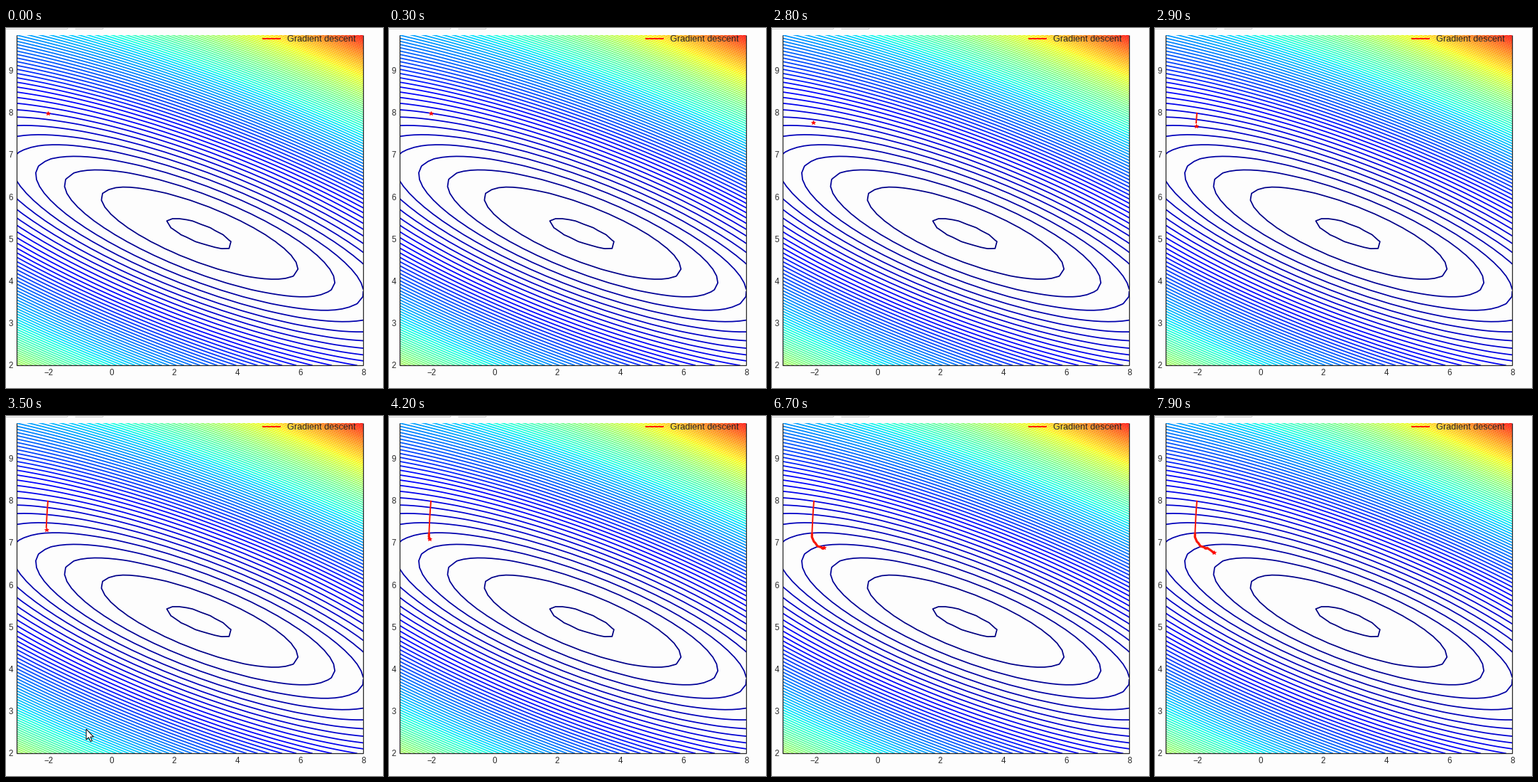
Write a matplotlib script that moves like this. It is 531 px wide and 506 px high and loops after 8000 ms.

```python
import numpy as np
import matplotlib.pyplot as plt
from matplotlib.animation import FuncAnimation
from matplotlib.patches import Polygon, Rectangle

W, H, DPI = 531, 506, 64
STEP_MS, FRAMES = 100, 80
PT = 72 / DPI  # points per pixel
INK = "0.15"
LEFT, RIGHT, TOP, BOTTOM = 15.3, 503.3, 9.5, 474.3

plt.rcParams["font.family"] = "Liberation Sans"
fig = plt.figure(figsize=(W / DPI, H / DPI), dpi=DPI, facecolor="#fdfdfd")
ax = fig.add_axes([0, 0, 1, 1])
ax.set(xlim=(0, W), ylim=(H, 0))
ax.axis("off")


def to_px(x, y):
    return 148.4 + 44.36 * x, BOTTOM - 59.25 * (y - 2)


def line(xs, ys, color=INK, width=1.25, z=5, **kw):
    return ax.plot(xs, ys, color=color, lw=width * PT, zorder=z, **kw)[0]


def label(x, y, text, size, ha):
    ax.text(x, y, text, fontsize=size * PT, color=INK, ha=ha,
            va="center_baseline", zorder=6)


def draw_cost():
    """Quadratic cost of a two-parameter fit, as evenly spaced contours."""
    x, y = np.meshgrid(np.linspace(-3, 8, 50), np.linspace(2, 10, 50))
    px, py = to_px(x, y)
    u, v = (px - 272.7) / 130.6, (py - 288.5) / 61.26
    rho = 0.765
    cost = (u * u - 2 * rho * u * v + v * v) / (1 - rho * rho)
    levels = 0.128 + np.arange(97)
    curves = ax.contour(px, py, cost, levels=levels, cmap="jet",
                        linewidths=1.75 * PT, zorder=2)
    curves.set_clip_path(Rectangle((LEFT, TOP), RIGHT - LEFT, BOTTOM - TOP,
                                   transform=ax.transData))


def draw_frame():
    line([LEFT, LEFT, RIGHT, RIGHT], [TOP, BOTTOM, BOTTOM, TOP],
         solid_capstyle="butt", solid_joinstyle="miter")
    for x in range(-2, 9, 2):
        label(to_px(x, 0)[0], 484, str(x).replace("-", "\u2212"), 11.5, "center")
    for y in range(2, 10):
        label(10.3, to_px(0, y)[1] - 0.3, str(y), 11.5, "right")
    line([360.5, 386.5], [14.5, 14.5], "red", 1.75, solid_capstyle="butt")
    label(396, 14.3, "Gradient descent", 12.6, "left")
    for a, b in [(0, 87), (98, 137)]:
        line([a, b - 1, b], [1.5, 1.5, 0], "0.8", 1)


draw_cost()
draw_frame()

# Path of the estimate: update number, x, y
KEYS = np.array([
    (0, 59, 119.8), (1, 58, 133.3), (3, 57.4, 143), (8, 56.6, 160),
    (13, 56.2, 170), (18, 59, 176.5), (19, 61, 178.5), (21, 63.4, 182),
    (22, 64.2, 183), (30, 70, 184.8), (31, 70.6, 186), (33, 72.3, 186.3),
    (35, 73.4, 185.3), (42, 79.5, 189.5), (46, 82.7, 192.3),
])
steps = np.arange(47)
path_x = np.interp(steps, KEYS[:, 0], KEYS[:, 1])
path_y = np.interp(steps, KEYS[:, 0], KEYS[:, 2])

FIRST, PAUSES = 28, {46, 48, 51, 62, 65, 75}
THICK = 11

trail = line([], [], "#f81808", 2, z=7)
wide = line([], [], "#f81808", 3.2, z=7)
head = line([], [], "red", 1, z=8, marker="*", markersize=6 * PT,
            markeredgewidth=0.8 * PT)
pointer = np.array([(0, 0), (0, 15), (3.5, 11.8), (6, 17.5), (8.3, 16.5),
                    (5.9, 11), (10.3, 11)]) + (113, 440)
cursor = ax.add_patch(Polygon(pointer, facecolor="white", edgecolor="black",
                              lw=PT, zorder=9))


def draw(i):
    n = sum(k not in PAUSES for k in range(FIRST, i + 1))
    trail.set_data(path_x[:n], path_y[:n])
    wide.set_data(path_x[THICK:n], path_y[THICK:n])
    head.set_data([path_x[n]], [path_y[n]])
    cursor.set_visible(33 <= i < 37)
    return trail, wide, head, cursor


anim = FuncAnimation(fig, draw, frames=FRAMES, interval=STEP_MS,
                     init_func=lambda: draw(0), repeat=True, repeat_delay=0)
plt.show()
```
